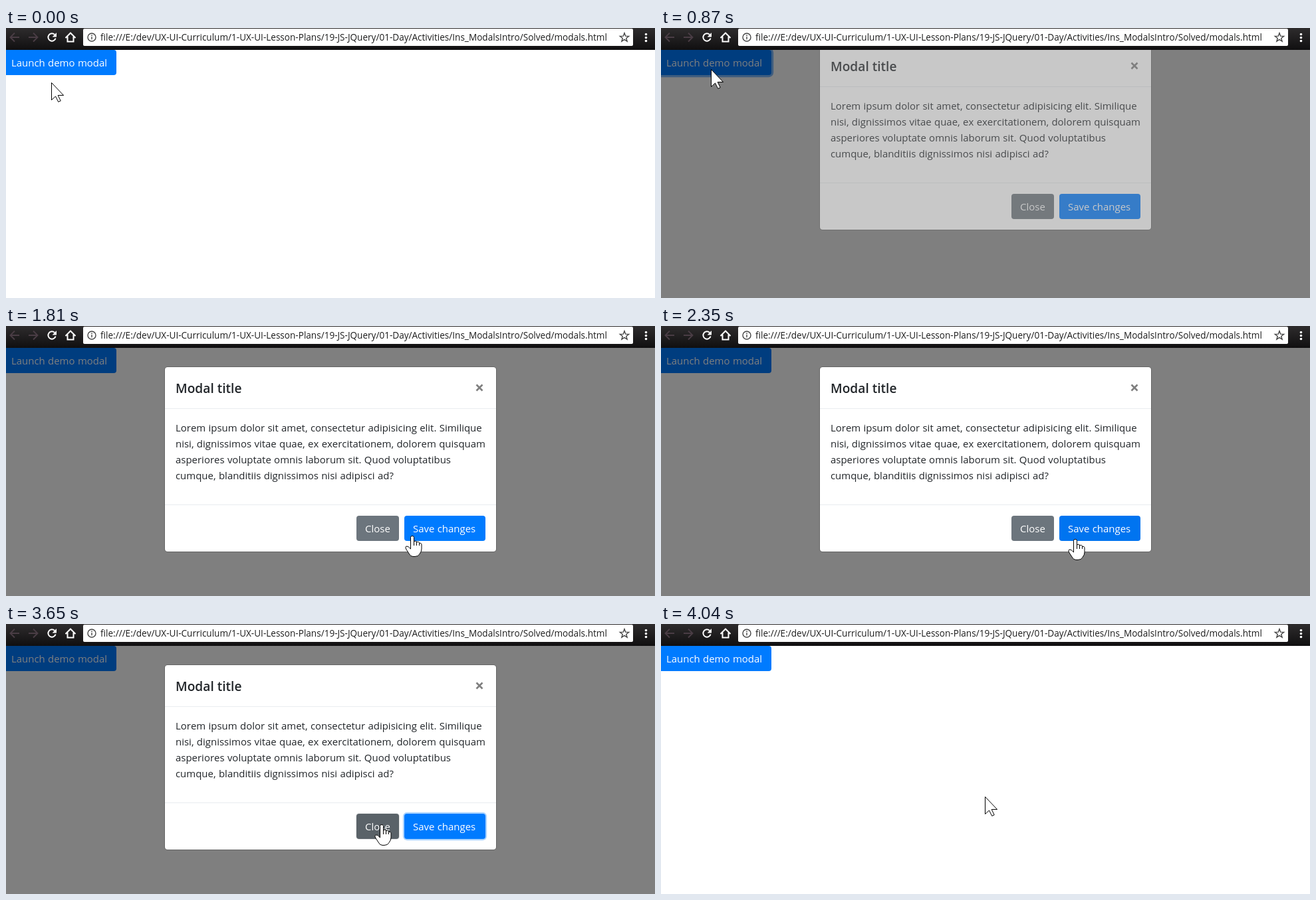
Write an HTML page with a canvas that moves like this. It is 976x407 px and loops after 4100 ms.

```html
<!DOCTYPE html>
<html lang="en">
<head>
<meta charset="utf-8">
<title>Modal demo</title>
<style>
  html, body { margin: 0; width: 100%; height: 100%; overflow: hidden; background: #fff; }
  canvas { display: block; }
</style>
</head>
<body>
<canvas id="stage" width="976" height="407"></canvas>
<script>
const W = 976, H = 407, LOOP = 4100, BAR = 33;
const stage = document.getElementById('stage');
const ctx = stage.getContext('2d');
const layer = document.createElement('canvas');
layer.width = W;
layer.height = H;
const layerCtx = layer.getContext('2d');

const FONT = '"Open Sans", "Noto Sans", sans-serif';
const TEXT_SIZE = 14.96;
const URL_TEXT = 'file:///E:/dev/UX-UI-Curriculum/1-UX-UI-Lesson-Plans/19-JS-JQuery/01-Day/Activities/Ins_ModalsIntro/Solved/modals.html';
const BODY = [
  'Lorem ipsum dolor sit amet, consectetur adipisicing elit. Similique',
  'nisi, dignissimos vitae quae, ex exercitationem, dolorem quisquam',
  'asperiores voluptate omnis laborum sit. Quod voluptatibus',
  'cumque, blanditiis dignissimos nisi adipisci ad?'
];
const BLUE = { base: [0, 123, 255], hover: [0, 105, 217] };
const GRAY = { base: [108, 117, 125], hover: [90, 98, 104] };

const TICKS = [0, 80, 150, 230, 310, 550, 630, 700, 790, 870, 940, 1020, 1110, 1190, 1270,
  1340, 1420, 1500, 1580, 1650, 1810, 1890, 1970, 2040, 2120, 2190, 2270, 2350, 2420, 2500,
  2650, 2730, 2870, 2950, 3020, 3100, 3180, 3650, 3730, 3810, 3890, 3960, 4040];

// Pointer path: time, x, y
const PATH = [
  [40, 68, 82], [310, 75, 62], [1050, 75, 62], [1580, 580, 310], [1650, 603, 313],
  [1810, 611, 316], [2190, 618, 327], [2270, 620, 326], [2500, 629, 307],
  [2870, 629, 307], [3180, 565, 302], [3830, 565, 302], [4040, 487, 260]
];
const HAND_TIMES = [[230, 630], [1580, 2100], [2350, 3850]];

const clamp = v => Math.max(0, Math.min(1, v));
const ramp = (t, start, len = 150) => clamp((t - start) / len);
const pulse = (t, on, off) => ramp(t, on) - ramp(t, off);
const smooth = k => k * k * (3 - 2 * k);

// CSS ease-out: cubic-bezier(0, 0, .58, 1)
function easeOut(x) {
  let lo = 0, hi = 1;
  for (let i = 0; i < 20; i++) {
    const s = (lo + hi) / 2;
    if (1.74 * (1 - s) * s * s + s ** 3 < x) lo = s; else hi = s;
  }
  return smooth(lo);
}

function pointerAt(t) {
  const i = PATH.findIndex(p => p[0] > t);
  if (i === 0) return PATH[0].slice(1);
  if (i < 0) return PATH[PATH.length - 1].slice(1);
  const [t0, x0, y0] = PATH[i - 1], [t1, x1, y1] = PATH[i];
  const k = smooth((t - t0) / (t1 - t0));
  return [Math.round(x0 + (x1 - x0) * k), Math.round(y0 + (y1 - y0) * k)];
}

function box(c, x, y, w, h, r, fill) {
  c.beginPath();
  c.roundRect(x, y, w, h, r);
  c.fillStyle = fill;
  c.fill();
}

function text(c, str, x, y, color, size = TEXT_SIZE, weight = 400) {
  c.font = `${weight} ${size}px ${FONT}`;
  c.wordSpacing = size === TEXT_SIZE ? '0.45px' : '0px';
  c.fontKerning = 'none';
  c.fillStyle = color;
  c.fillText(str, x, y);
}

function button(c, label, x, y, w, colors, hover, focus) {
  if (focus > 0) {
    const s = 3.2 * focus;
    box(c, x - s, y - s, w + 2 * s, 38 + 2 * s, 4 + s, `rgba(${colors.base},${0.5 * focus})`);
  }
  const mix = colors.base.map((v, i) => Math.round(v + (colors.hover[i] - v) * hover));
  box(c, x, y, w, 38, 4, `rgb(${mix})`);
  text(c, label, x + 13, y + 25, '#fff');
}

function line(c, d, color, width) {
  c.strokeStyle = color;
  c.lineWidth = width;
  c.stroke(new Path2D(d));
}

function drawModal(t, dy) {
  const c = layerCtx;
  c.clearRect(0, 0, W, H);
  c.save();
  c.translate(0, dy);
  box(c, 239, 62, 498, 278, 4, '#fff');
  c.beginPath();
  c.roundRect(238.5, 61.5, 499, 279, 4.5);
  c.strokeStyle = 'rgba(0,0,0,.2)';
  c.lineWidth = 1;
  c.stroke();
  c.fillStyle = '#e9ecef';
  c.fillRect(239, 124, 498, 1);
  c.fillRect(239, 269, 498, 1);
  text(c, 'Modal title', 255, 101, '#212529', 19.15, 600);
  line(c, 'M707.5 88.5l9 9m0-9l-9 9', '#7f7f7f', 2.6);
  BODY.forEach((s, i) => text(c, s, 255, 159 + 24 * i, '#212529'));
  button(c, 'Close', 527, 286, 64, GRAY, pulse(t, 1480, 1660) + pulse(t, 3060, 3900), ramp(t, 3600));
  button(c, 'Save changes', 599, 286, 122, BLUE,
    pulse(t, 1830, 2080) + pulse(t, 2290, 2890), pulse(t, 2580, 3600));
  c.restore();
}

function drawToolbar() {
  const grad = ctx.createLinearGradient(0, 0, 0, BAR);
  grad.addColorStop(0, '#2e2c2d');
  grad.addColorStop(1, '#100f10');
  ctx.fillStyle = grad;
  ctx.fillRect(0, 0, W, BAR);

  line(ctx, 'M20 14H7M13 7.5L6.5 14L13 20.5', '#4a3d45', 1.9);
  line(ctx, 'M34 14H47M41 7.5L47.5 14L41 20.5', '#4a3d45', 1.9);
  line(ctx, 'M73.2 10A5.7 5.7 0 1 0 74.6 15.5', '#fff', 2);
  ctx.fillStyle = '#fff';
  ctx.fill(new Path2D('M76 7V13.4H69.6Z'));
  line(ctx, 'M89.5 15L97 7.5L104.5 15M92.5 13V20.5H101.5V13', '#fff', 2);

  box(ctx, 116, 1, 827, 26, 2, '#fff');
  line(ctx, 'M135 14a6 6 0 1 1-12 0a6 6 0 1 1 12 0M129 13v4.2M129 10.3v1.6', '#444', 1.4);
  text(ctx, URL_TEXT, 142, 19, '#1c1c1c', 13.57);

  ctx.beginPath();
  for (let i = 0; i < 10; i++) {
    const a = i * Math.PI / 5 - Math.PI / 2, r = i % 2 ? 2.9 : 7;
    ctx.lineTo(930 + r * Math.cos(a), 14.5 + r * Math.sin(a));
  }
  ctx.closePath();
  ctx.strokeStyle = '#444';
  ctx.lineWidth = 1.4;
  ctx.stroke();

  ctx.fillStyle = '#fff';
  for (const y of [9, 14, 19]) {
    ctx.beginPath();
    ctx.arc(962.5, y + 0.5, 1.8, 0, 7);
    ctx.fill();
  }
}

const ARROW = new Path2D('M.5.5V26.5L6.5 21L10.7 29.4L14.2 27.8L10.2 19.5H18.6Z');
const HAND = new Path2D('M-2.5 2.5Q-2.5.5 0 .5T2.5 2.5V9Q4.5 7 6.5 9V10Q8.8 8.3 10.5 10.5V11.5' +
  'Q14 10.5 14 14V20Q14 24 11 27.5Q9.5 31.5 4 31.5H1Q-3 31.5-5 27L-9.5 20Q-11 17-9 16Q-6.5 15-2.5 20Z');
const KNUCKLES = new Path2D('M2.5 9V15M6.5 10V15M10.5 11.5V15');

function drawPointer(t) {
  const [x, y] = pointerAt(t);
  const hand = HAND_TIMES.some(([a, b]) => t >= a && t < b);
  const shape = hand ? HAND : ARROW;
  ctx.save();
  ctx.translate(x, y);
  ctx.fillStyle = '#fff';
  ctx.strokeStyle = '#000';
  ctx.lineWidth = 1;
  ctx.fill(shape);
  ctx.stroke(shape);
  if (hand) ctx.stroke(KNUCKLES);
  ctx.restore();
}

function draw(t) {
  ctx.fillStyle = '#fff';
  ctx.fillRect(0, 0, W, H);
  button(ctx, 'Launch demo modal', -5, 33, 171, BLUE, pulse(t, 160, 700), pulse(t, 480, 1040));

  const shade = 0.5 * pulse(t, 616, 3835);
  ctx.fillStyle = `rgba(0,0,0,${shade})`;
  ctx.fillRect(0, BAR, W, H - BAR);

  const alpha = pulse(t, 785, 3677);
  if (alpha > 0) {
    const shown = easeOut(ramp(t, 770, 300)) - easeOut(ramp(t, 3658, 300));
    drawModal(t, Math.round(-70 * (1 - shown)));
    ctx.globalAlpha = alpha;
    ctx.drawImage(layer, 0, 0);
    ctx.globalAlpha = 1;
  }
  drawToolbar();
  drawPointer(t);
}

const begin = performance.now();
function loop() {
  const t = (performance.now() - begin) % LOOP;
  draw(TICKS.findLast(k => k <= t));
  requestAnimationFrame(loop);
}
loop();
</script>
</body>
</html>
```
